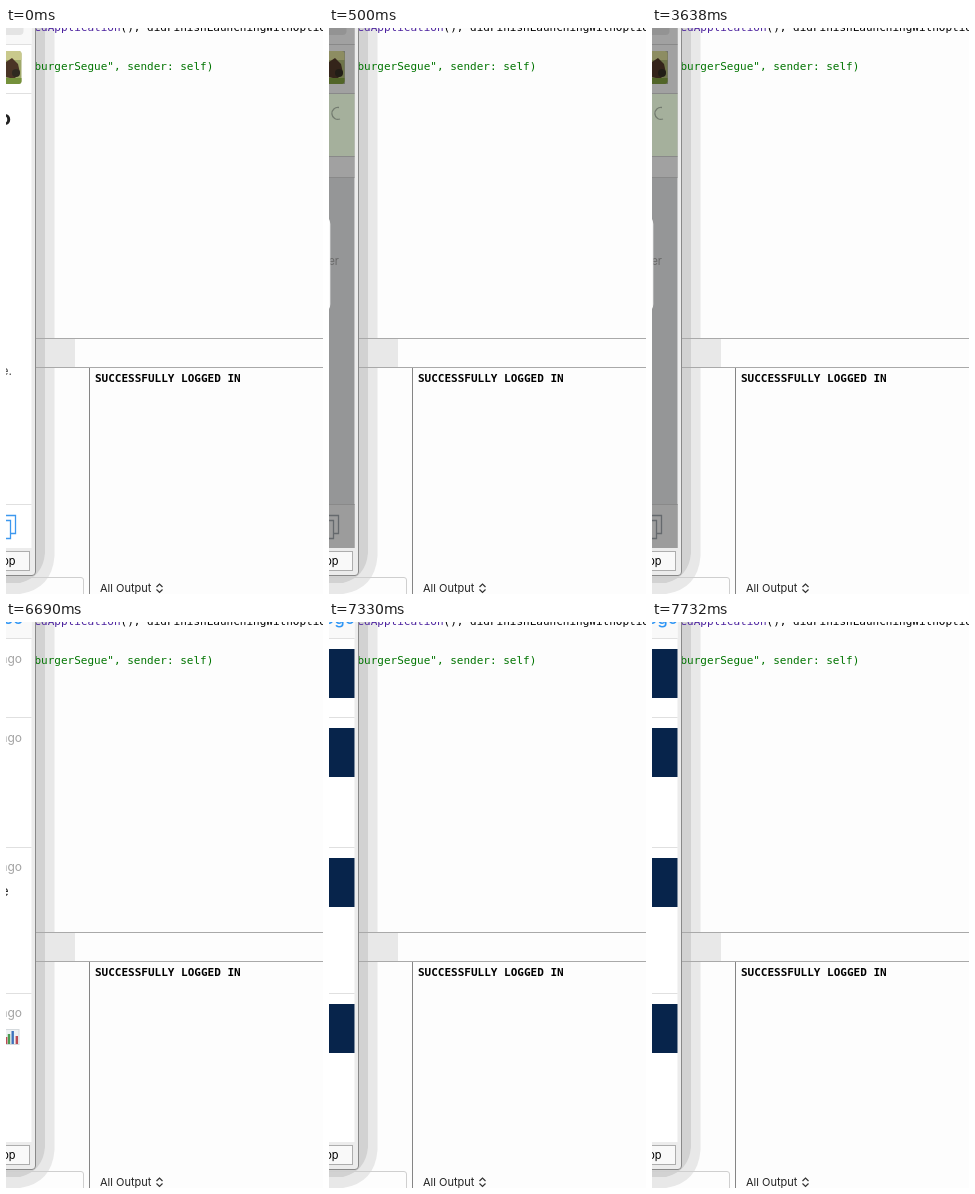
An HTML page that plays this animation: 317x566 px, repeating every 8000 ms.

```html
<!DOCTYPE html>
<html lang="en">
<head>
<meta charset="utf-8">
<style>
  html, body { margin: 0; width: 100%; height: 100%; overflow: hidden; background: #fdfdfd; }
  svg { display: block; width: 317px; height: 566px; }
  text { font: 11px Inter, sans-serif; white-space: pre; }
  .code { font: 11px "DejaVu Sans Mono", monospace; }
  .bold { font-weight: bold; }
  .end { text-anchor: end; }
  .ago { font-size: 12px; fill: #a3a3a3; text-anchor: end; }
  .title { font-size: 17px; font-weight: 500; fill: #2d95f5; text-anchor: end; }
  .rule { stroke: #e0e0e0; }
  .icon { fill: none; stroke: #3d98ee; stroke-width: 1.3; }
</style>
</head>
<body>
<svg viewBox="0 0 317 566">
  <defs>
    <clipPath id="screen"><rect width="25.5" height="520"/></clipPath>
    <clipPath id="thumb"><rect x="-20" y="23" width="35.5" height="33" rx="3"/></clipPath>
    <g id="photo" clip-path="url(#thumb)">
      <rect y="23" width="16" height="33" fill="#9fa86a"/>
      <rect y="23" width="16" height="9" fill="#c9c98c"/>
      <path d="M0 34L6 30L12 36L14 45L8 51L0 49Z" fill="#4a3425"/>
      <circle cx="10" cy="45" r="4" fill="#2f2a20"/>
      <rect y="50" width="16" height="6" fill="#75913b"/>
    </g>
    <path id="tabs" d="M-9 492.5H4.5V510.5H-9M-3 492V487.5H9.5V505.5H5"/>
    <path id="rows" class="rule" d="M0 16.5H26M0 95.5H26M0 225.5H26M0 371.5H26"/>
  </defs>

  <!-- editor and console -->
  <rect width="317" height="566" fill="#fdfdfd"/>
  <rect x="29" y="311" width="40" height="28" fill="#e8e8e8"/>
  <path d="M0 0H48.5V528Q46 561 14 566H0Z" fill="#e8e8e8"/>
  <path d="M0 0H39V525Q37 549 14 555H0Z" fill="#d2d2d2"/>
  <path d="M29 310.5H317M29 339.5H317" stroke="#a9a9a9"/>
  <path d="M83.5 340V566" stroke="#858585"/>
  <path d="M0 549.5H75Q77.5 549.5 77.5 552V566" fill="none" stroke="#cfcfcf"/>
  <text class="code" x="28.5" y="3"><tspan fill="#4b219e">edApplication</tspan>(), didFinishLaunchingWithOptio</text>
  <text class="code" x="28.5" y="42" fill="#007400">burgerSegue", sender: self)</text>
  <text class="code bold" x="89" y="354">SUCCESSFULLY LOGGED IN</text>
  <text x="94" y="564" fill="#222">All Output</text>
  <path d="M150.5 559L153.5 556L156.5 559M150.5 561.5L153.5 564.5L156.5 561.5" fill="none" stroke="#333" stroke-width="1.2"/>

  <!-- simulator window -->
  <path d="M-1 -1H29.5V544Q29.5 547.5 26 547.5H-1Z" fill="#ececec" stroke="#898989"/>
  <rect x="-10" y="523.5" width="33.5" height="19" fill="#f9f9f9" stroke="#adadad"/>
  <text class="end" x="9.5" y="537">op</text>

  <g clip-path="url(#screen)">
    <rect width="26" height="520" fill="#fff"/>
    <g class="scene">
      <rect width="26" height="16" fill="#f8f8f8"/>
      <rect x="-20" y="-8" width="37.5" height="15" rx="4" fill="#e4e4e4"/>
      <path class="rule" d="M0 16.5H26M0 65.5H26M0 476.5H26"/>
      <use href="#photo"/>
      <text class="end bold" x="5" y="97" font-size="20" style="font-size:20px" fill="#222">o</text>
      <text class="end" x="6" y="347" style="font-size:12px" fill="#444">e.</text>
      <use href="#tabs" class="icon"/>
    </g>
    <g class="scene">
      <rect width="26" height="520" fill="#959697"/>
      <rect width="26" height="65" fill="#a1a1a1"/>
      <rect x="-20" y="-8" width="37.5" height="15" rx="4" fill="#939393"/>
      <use href="#photo"/>
      <rect x="0" y="23" width="16" height="33" fill="#000" opacity=".3"/>
      <rect y="65" width="26" height="64" fill="#a5b09c"/>
      <rect y="129" width="26" height="20" fill="#a1a1a1"/>
      <rect y="476" width="26" height="44" fill="#9c9c9c"/>
      <path d="M0 16.5H26M0 65.5H26M0 128.5H26M0 149.5H26M0 476.5H26" stroke="#898989"/>
      <path d="M10 79.5A6 6 0 1 0 11 91" fill="none" stroke="#747c70" stroke-width="1.3"/>
      <text class="end" x="10" y="237" fill="#686868">er</text>
      <rect x="-40" y="186" width="41.3" height="100" rx="10" fill="#f7f7f7"/>
      <use href="#tabs" class="icon" style="stroke:#65696d"/>
    </g>
    <g class="scene">
      <rect width="26" height="16" fill="#f9f9f9"/>
      <use href="#rows"/>
      <text class="title" x="17" y="2">se</text>
      <text class="ago" x="16" y="41">ago</text>
      <text class="ago" x="16" y="120">ago</text>
      <text class="ago" x="16" y="249">ago</text>
      <text class="ago" x="16" y="395">ago</text>
      <text class="end" x="2.5" y="274" style="font-size:13px" fill="#222">e</text>
      <rect x="-3" y="407.5" width="16" height="15" fill="#eef1f3" stroke="#d5dadd"/>
      <path d="M3 422V412" stroke="#4a9b51" stroke-width="2.4"/>
      <path d="M6.7 422V409" stroke="#3e72bb" stroke-width="2.4"/>
      <path d="M.2 422V415M10.8 422V414" stroke="#bb4b55" stroke-width="2.4"/>
    </g>
    <g class="scene">
      <rect width="26" height="16" fill="#f9f9f9"/>
      <use href="#rows"/>
      <text class="title" x="26" y="2">ogo</text>
      <path d="M0 27H26V76H0ZM0 106H26V155H0ZM0 236H26V285H0ZM0 382H26V431H0Z" fill="#07244b"/>
    </g>
  </g>
</svg>
<script>
  const LOOP = 8000;
  const starts = [0, 500, 5730, 7330];
  const scenes = document.querySelectorAll('.scene');
  const begin = performance.now();

  function draw() {
    const time = (performance.now() - begin) % LOOP;
    const current = starts.findLastIndex(start => time >= start);
    scenes.forEach((scene, i) => { scene.style.display = i === current ? '' : 'none'; });
    requestAnimationFrame(draw);
  }
  draw();
</script>
</body>
</html>
```
